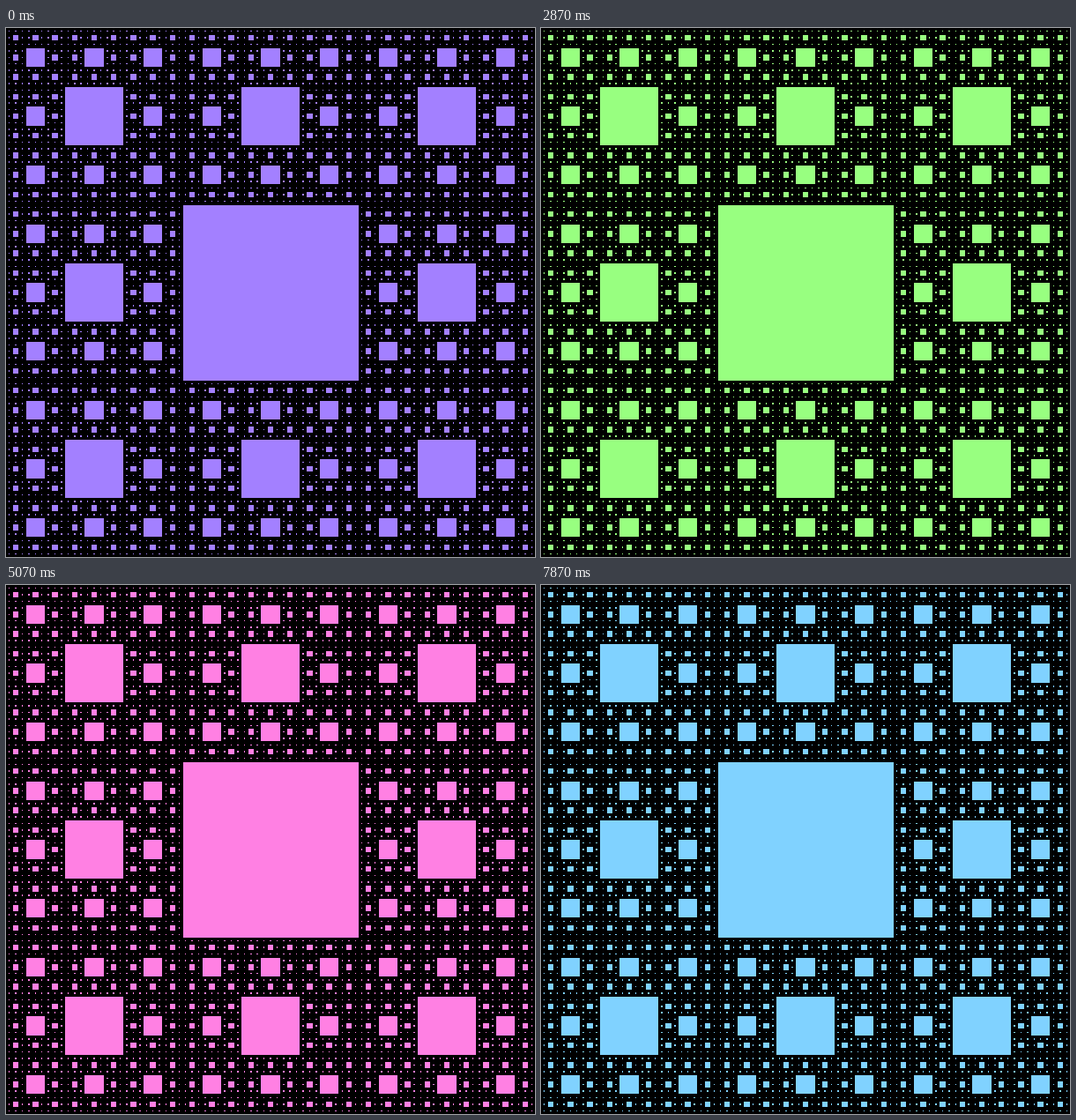
Recreate the animation shown at these times as an HTML page with a canvas. Size 600x600 px, loop 8 s.

```html
<!DOCTYPE html>
<html lang="en">
<head>
<meta charset="utf-8">
<title>Carpet</title>
<style>
  html, body { margin: 0; width: 100%; height: 100%; overflow: hidden; background: #000; }
  canvas { display: block; width: 600px; height: 600px; }
</style>
</head>
<body>
<canvas id="stage" width="600" height="600"></canvas>
<script>
const SIZE = 600, DEPTH = 5, LOOP = 8000, TICK = 1000 / 7.5;
const ctx = document.getElementById('stage').getContext('2d');

// [tick, hue in degrees], linear in between
const KEYS = [[0, 256.5], [17, 415], [26, 535], [33, 612], [43, 734], [52, 836], [59, 921]];

function hueAt(tick) {
  const i = Math.max(1, KEYS.findIndex(([t]) => t >= tick));
  const [t0, h0] = KEYS[i - 1], [t1, h1] = KEYS[i];
  return h0 + (h1 - h0) * (tick - t0) / (t1 - t0);
}

// Each hole is inset by a one-pixel black outline
const carpet = new Path2D();
function carve(col, row, cells, depth) {
  const edge = k => Math.floor(k * SIZE / cells + 1e-6);
  const x = edge(col + 1) + 1, y = edge(row + 1) + 1;
  carpet.rect(x, y, edge(col + 2) - x, edge(row + 2) - y);
  if (depth === DEPTH) return;
  for (let i = 0; i < 9; i++) {
    if (i !== 4) carve((col + i % 3) * 3, (row + Math.floor(i / 3)) * 3, cells * 3, depth + 1);
  }
}
carve(0, 0, 3, 1);

let shown = -1;
function draw(ms) {
  // Small lead absorbs clock rounding
  const tick = Math.min(59, Math.floor((ms % LOOP + 4) / TICK));
  if (tick === shown) return;
  shown = tick;
  ctx.fillStyle = '#000';
  ctx.fillRect(0, 0, SIZE, SIZE);
  ctx.fillStyle = `hsl(${hueAt(tick) % 360}, 100%, 75%)`;
  ctx.fill(carpet);
}

let origin = null;
function frame(now) {
  if (origin === null) origin = now;
  draw(Math.max(0, now - origin));
  requestAnimationFrame(frame);
}
draw(0);
requestAnimationFrame(frame);
</script>
</body>
</html>
```
